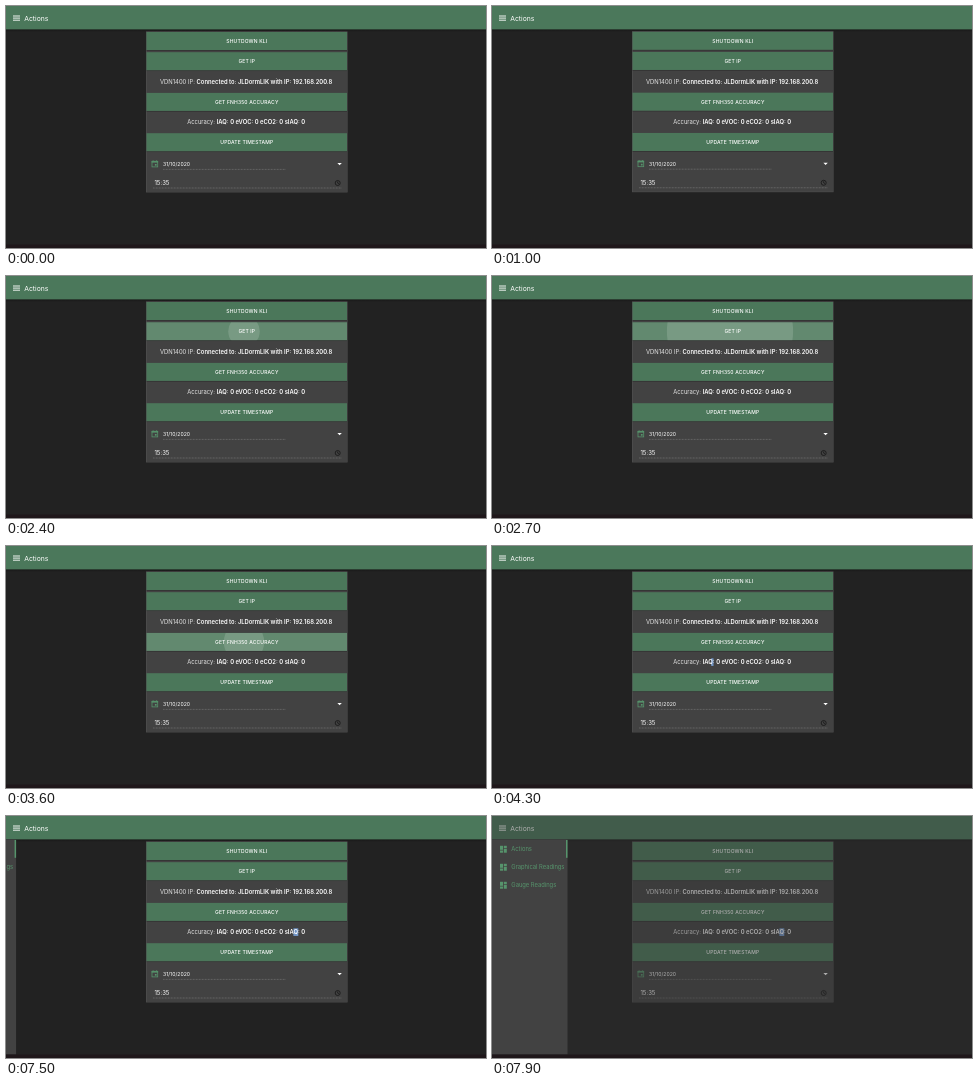
Animation of 480x242 px, one loop 8 s. Source, as an HTML page with a canvas:

```html
<!DOCTYPE html>
<html lang="en">
<head>
<meta charset="utf-8">
<title>Actions</title>
<style>
  html, body { margin: 0; width: 100%; height: 100%; overflow: hidden; background: #222; }
  canvas { display: block; width: 480px; height: 242px; }
</style>
</head>
<body>
<canvas id="stage"></canvas>
<script>
const W = 480, H = 242, LOOP = 8000, STEP = 100;
const GREEN = '#4b775a', BAR = '#4b785b', CARD = '#424242', ACCENT = '#56946c';
const FAMILY = 'Inter, "Open Sans", sans-serif';

const canvas = document.getElementById('stage');
const ctx = canvas.getContext('2d');
const dpr = window.devicePixelRatio || 1;
canvas.width = W * dpr;
canvas.height = H * dpr;

const clamp = v => Math.min(1, Math.max(0, v));
const smooth = v => { v = clamp(v); return v * v * (3 - 2 * v); };

function box(x, y, w, h, color) {
  ctx.fillStyle = color;
  ctx.fillRect(x, y, w, h);
}

// y is the middle of the capital letters
function text(str, x, y, size, { weight = 400, color = '#fff', align = 'left', spacing = 0 } = {}) {
  ctx.font = `${weight} ${size}px ${FAMILY}`;
  ctx.letterSpacing = spacing + 'px';
  ctx.textAlign = align;
  ctx.fillStyle = color;
  ctx.fillText(str, x, y + size * 0.364);
}

function line(x1, y1, x2, y2, color, width, dash = []) {
  ctx.strokeStyle = color;
  ctx.lineWidth = width;
  ctx.setLineDash(dash);
  ctx.beginPath();
  ctx.moveTo(x1, y1);
  ctx.lineTo(x2, y2);
  ctx.stroke();
  ctx.setLineDash([]);
}

// A light label followed by a bold value, centred as one line
function reading(label, value, y) {
  const size = 5.85;
  ctx.letterSpacing = '0px';
  ctx.font = `400 ${size}px ${FAMILY}`;
  const lw = ctx.measureText(label).width;
  ctx.font = `600 ${size}px ${FAMILY}`;
  const x = 240.2 - (lw + ctx.measureText(value).width) / 2;
  text(label, x, y, size, { color: '#e4e4e4' });
  text(value, x + lw, y, size, { weight: 600 });
}

// Press highlight with a circle growing from the middle
function ripple(t, start, dur, y) {
  const p = (t - start + STEP) / dur;
  if (t < start || p >= 1) return;
  const fade = 1 - clamp((p - 0.6) / 0.4);
  ctx.save();
  ctx.beginPath();
  ctx.rect(140.5, y, 200.5, 18);
  ctx.clip();
  box(140, y, 202, 18, `rgba(255,255,255,${0.13 * fade})`);
  ctx.fillStyle = `rgba(255,255,255,${0.14 * fade})`;
  ctx.beginPath();
  ctx.arc(238, y + 9, 142 * p, 0, Math.PI * 2);
  ctx.fill();
  ctx.restore();
}

function button(label, y) {
  box(140.5, y + 18, 200.5, 0.9, 'rgba(0,0,0,.22)');
  box(140.5, y, 200.5, 18, GREEN);
  return () => text(label, 240.8, y + 9.1, 5.02, { weight: 500, align: 'center', spacing: 0.14 });
}

function calendarIcon(x, y) {
  ctx.strokeStyle = ACCENT;
  ctx.lineWidth = 0.8;
  ctx.strokeRect(x + 0.4, y + 1, 5.7, 5.6);
  box(x, y + 0.8, 6.5, 1.5, ACCENT);
  box(x + 1.1, y, 0.8, 1, ACCENT);
  box(x + 4.6, y, 0.8, 1, ACCENT);
  box(x + 3.3, y + 3.7, 1.7, 1.7, ACCENT);
}

function clockIcon(x, y) {
  ctx.strokeStyle = '#161616';
  ctx.lineWidth = 0.8;
  ctx.beginPath();
  ctx.arc(x, y, 2.5, 0, Math.PI * 2);
  ctx.moveTo(x, y - 1.5);
  ctx.lineTo(x, y + 0.1);
  ctx.lineTo(x + 1.2, y + 0.8);
  ctx.stroke();
}

function card(t) {
  box(140, 25.4, 201.5, 161, '#545454');
  box(140.5, 25.8, 200.5, 160.2, CARD);

  const labels = [
    button('SHUTDOWN KLI', 26),
    button('GET IP', 46.2),
    button('GET FNH350 ACCURACY', 86.9),
    button('UPDATE TIMESTAMP', 127.2)
  ];
  ripple(t, 2400, 900, 46.2);
  ripple(t, 3600, 700, 86.9);
  labels.forEach(draw => draw());

  if (t >= 4200 && t < 5500) box(219.2, 112.3, 2.3, 7.7, '#6f93c4');
  if (t >= 5500) box(287.4, 112.3, 4.9, 7.7, '#6f93c4');
  reading('VDN1400 IP: ', 'Connected to: JLDormLIK with IP: 192.168.200.8', 75.9);
  reading('Accuracy: ', 'IAQ: 0 eVOC: 0 eCO2: 0 sIAQ: 0', 116.2);

  calendarIcon(145.6, 154.3);
  text('31/10/2020', 157, 158.4, 5.15);
  line(157, 163.4, 280, 163.4, '#858585', 0.6, [0.8, 0.7]);
  ctx.fillStyle = '#fff';
  ctx.beginPath();
  ctx.moveTo(331.4, 156.9);
  ctx.lineTo(335.8, 156.9);
  ctx.lineTo(333.6, 159.2);
  ctx.fill();

  text('15:35', 148.4, 177, 6);
  line(147, 182, 336, 182, '#858585', 0.6, [0.8, 0.7]);
  clockIcon(331.7, 177);
}

function appBar() {
  const shade = ctx.createLinearGradient(0, 23, 0, 26);
  shade.addColorStop(0, 'rgba(0,0,0,.35)');
  shade.addColorStop(1, 'rgba(0,0,0,0)');
  box(0, 23, W, 3, shade);
  box(0, 0, W, 23.4, BAR);
  for (const y of [10, 12.1, 14.2]) line(7, y, 14, y, '#fff', 0.9);
  text('Actions', 18.2, 12.3, 6.8);
}

function drawer(t) {
  const x = 75.5 * (smooth((t - 7390) / 480) - 1);
  ctx.save();
  ctx.translate(x, 0);
  box(0, 23.4, 75.5, 215.1, CARD);
  ['Actions', 'Graphical Readings', 'Gauge Readings'].forEach((label, i) => {
    const y = 33 + i * 18;
    box(8, y - 3.2, 3, 4, ACCENT);
    box(8, y + 1.5, 3, 2.2, ACCENT);
    box(11.8, y - 3.2, 3, 2.2, ACCENT);
    box(11.8, y - 0.3, 3, 4, ACCENT);
    text(label, 19.3, y, 5.8, { color: ACCENT });
  });
  box(74, 24, 1.5, 17.8, ACCENT);
  ctx.restore();
}

function draw(t) {
  ctx.setTransform(dpr, 0, 0, dpr, 0, 0);
  box(0, 0, W, H, '#222');

  // The page nudges up slightly and settles back
  const nudge = t >= 1000 && t < 1700 ? -0.6 * Math.sin(Math.PI * (t - 900) / 800) : 0;
  ctx.save();
  ctx.translate(0, nudge);
  card(t);
  ctx.restore();
  appBar();

  if (t >= 7500) {
    box(0, 0, W, H, `rgba(50,50,50,${0.4 * clamp((t - 7500) / 400)})`);
    drawer(t);
  }
  box(0, 238.5, W, 3.5, '#1f171a');
}

function tick(now) {
  const t = now % LOOP;
  draw(Math.floor(t / STEP) * STEP);
  requestAnimationFrame(tick);
}
draw(0);
requestAnimationFrame(tick);
</script>
</body>
</html>
```
